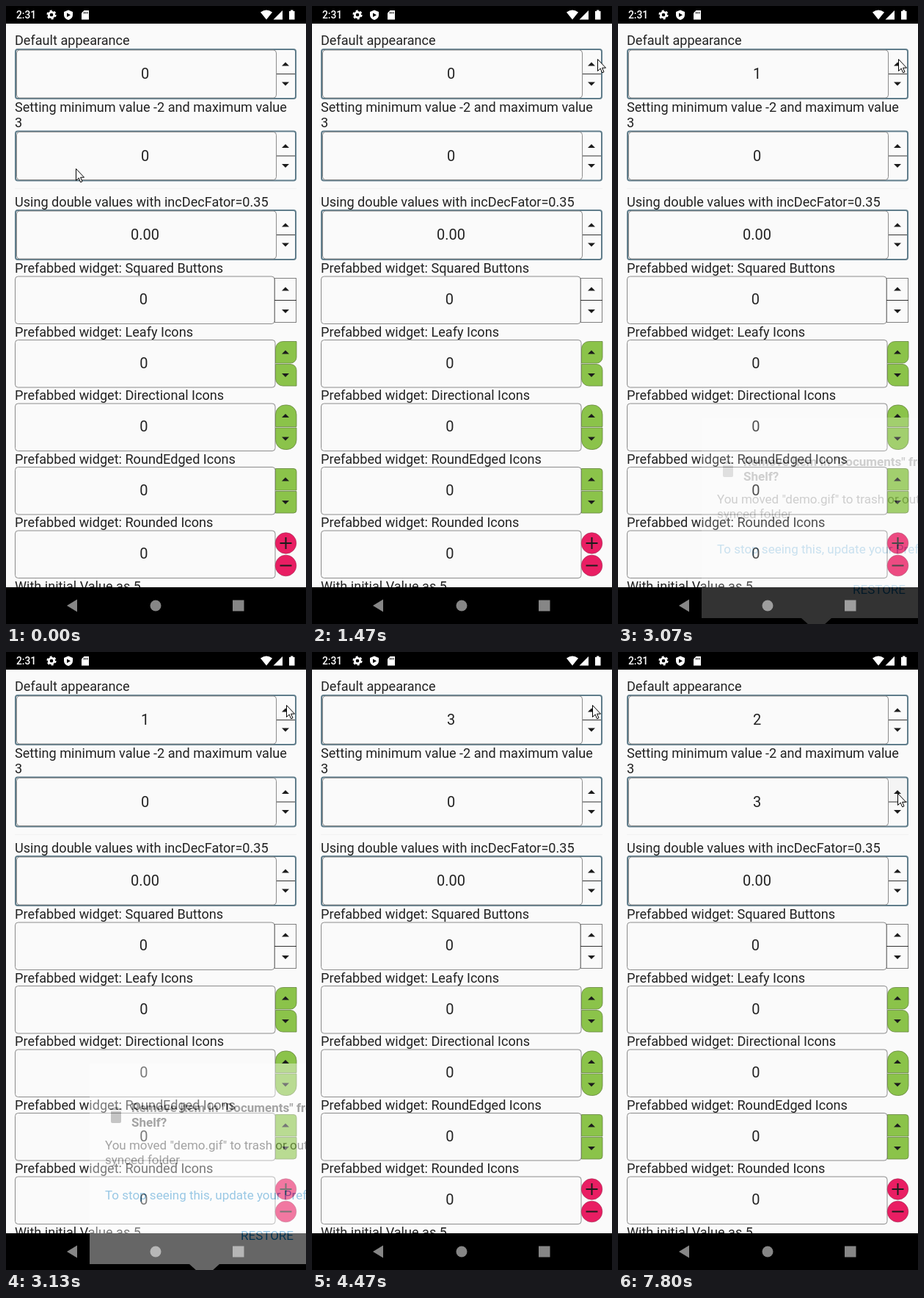
Animation of 409 by 841 pixels, one loop 8 s. Source, as an HTML page:

```html
<!DOCTYPE html>
<html lang="en">
<head>
<meta charset="utf-8">
<style>
html, body { margin: 0; width: 100%; height: 100%; overflow: hidden; background: #fafafa; }
svg { display: block; width: 409px; height: 841px; }
text { font: 18.1px Roboto, sans-serif; fill: #222; white-space: pre; }
.num { font-size: 20px; text-anchor: middle; }
.clock { font-size: 13.8px; font-weight: 500; fill: #fff; }
.frame { fill: none; stroke: #607d8b; stroke-width: 2; }
.field { fill: none; stroke: #8c8c8c; }
.line { stroke: #333; }
.icon { fill: #1c1c1c; }
.plain { fill: none; stroke: #808080; }
.green { fill: #8bc34a; stroke: #66853f; stroke-width: .8; }
.pink { fill: #e91e63; stroke: #9c2a50; stroke-width: .6; }
.sign { stroke: #1c1c1c; stroke-width: 2; }
#popup text { font-size: 17px; fill: #222; }
#popup .head { font-weight: 700; }
#popup .link { fill: #0b7fc7; }
</style>
</head>
<body>
<svg viewBox="0 0 409 841">
  <rect id="glow" x="370" y="172" width="24" height="32"/>
  <rect x="12" y="248" width="384" height="1" fill="#f2f2f2"/>
  <g id="list"></g>

  <rect width="409" height="24"/>
  <text class="clock" x="14" y="17">2:31</text>
  <g fill="#fff">
    <g fill="none" stroke="#fff">
      <circle cx="62" cy="12" r="3.7" stroke-width="2.8"/>
      <circle cx="62" cy="12" r="5.6" stroke-width="2" stroke-dasharray="2.93"/>
    </g>
    <path d="M85 5.5l6 2.500v4c0 3.500-2.500 6-6 7-3.500-1-6-3.500-6-7v-4z"/>
    <path d="M83 9.5l5 2.700-5 2.700z" fill="#000"/>
    <path d="M106.500 6h6.500v12.500h-10v-9z"/>
    <path d="M106.500 8v2.500M108.700 8v2.500M110.900 8v2.500" stroke="#000"/>
    <path d="M347 8.500Q355 2.500 363 8.500L355 18.500z"/>
    <path d="M377 6v12.500h-12.500z"/>
    <path d="M386 7h2V5.500h3.500V7h2v11.500H386z"/>
  </g>

  <rect y="791" width="409" height="50"/>
  <g fill="#868686">
    <path d="M83 816l14-8.500v17z"/>
    <circle cx="204" cy="816" r="7.5"/>
    <rect x="309" y="808.500" width="15.500" height="15"/>
  </g>

  <g id="popup">
    <path d="M114 560H409V833H291L281 842H260L250 833H114z" fill="#fff"/>
    <path d="M142 621h4l1.500-2h5l1.500 2h4v2.500h-16zM143 625h14v14q0 2-2 2h-10q-2 0-2-2z" fill="#777"/>
    <text class="head" x="171" y="626">Remove item in "Documents" from</text>
    <text class="head" x="171" y="646">Shelf?</text>
    <text x="135" y="677">You moved "demo.gif" to trash or out of</text>
    <text x="135" y="697">synced folder</text>
    <text class="link" x="135" y="745">To stop seeing this, update your Preferences</text>
    <text class="link" x="320" y="800">RESTORE</text>
  </g>

  <path id="cursor" d="M.5 .5V16.500L4.200 13 6.600 18.800 9 17.800 6.600 12.200H11.500z" fill="#fff" stroke="#000"/>
</svg>
<script>
const $ = id => document.getElementById(id);
const LOOP = 8000, FRAME = 200 / 3;

const label = (y, s) => `<text x="12" y="${y}">${s}</text>`;
const num = (x, y, s, id = '') => `<text class="num" id="${id}" x="${x}" y="${y}">${s}</text>`;
const up = y => `<path class="icon" d="M376 ${y + 2.5}l5-5 5 5z"/>`;
const down = y => `<path class="icon" d="M376 ${y - 2.5}l5 5 5-5z"/>`;
const rect = (cls, x, y, w, h, r = 0) =>
  `<rect class="${cls}" x="${x}" y="${y}" width="${w}" height="${h}" rx="${r}"/>`;

// Button with its own radius per corner: top left, top right, bottom right, bottom left
function button(y, [a, b, c, d]) {
  const x = 367.5, w = 28.5, h = 29.5;
  const arc = (r, dx, dy) => `a${r} ${r} 0 0 1 ${dx * r} ${dy * r}`;
  return `<path class="green" d="M${x + a} ${y}h${w - a - b}${arc(b, 1, 1)}v${h - b - c}` +
    `${arc(c, -1, 1)}h${c + d - w}${arc(d, -1, -1)}v${a + d - h}${arc(a, 1, -1)}z"/>`;
}

// Field inside a blue-grey frame
const framed = (dy, value, id) =>
  rect('frame', 13, 59 + dy, 382, 67, 3) +
  rect('field', 14.5, 60 + dy, 354, 65, 4) +
  `<path class="line" d="M369 ${92.5 + dy}H394"/>` +
  up(79 + dy) + down(106 + dy) + num(189.5, 99 + dy, value, id);

const squareButtons = y =>
  rect('plain', 366.5, y + 3, 29, 60) + `<path class="line" d="M366 ${y + 33}h30"/>` +
  up(y + 17.5) + down(y + 48);

// The lower button mirrors the upper one
const greenButtons = (a, b, c, d) => y =>
  button(y + 2.5, [a, b, c, d]) + button(y + 33.5, [d, c, b, a]) +
  up(y + 17) + down(y + 48.5);

const roundButtons = y =>
  [17.5, 48].map(dy => `<circle class="pink" cx="381.5" cy="${y + dy}" r="14.3"/>` +
    `<path class="sign" d="M373.500 ${y + dy}h16"/>`).join('') +
  `<path class="sign" d="M381.500 ${y + 9.5}v16"/>`;

const prefabs = [
  ['Squared Buttons', squareButtons],
  ['Leafy Icons', greenButtons(10, 0, 8, 0)],
  ['Directional Icons', greenButtons(13, 13, 0, 0)],
  ['RoundEdged Icons', greenButtons(0, 4, 0, 0)],
  ['Rounded Icons', roundButtons]
];

function prefab([name, buttons], i) {
  const y = 367.5 + 86.5 * i, w = i ? 354.5 : 353.5;
  return label(y - 4.5, 'Prefabbed widget: ' + name) +
    rect('field', 12.5, y + .5, w, 64.5, 4) +
    num(10.5 + w / 2, y + 38.5, 0) + buttons(y);
}

$('list').innerHTML =
  label(53, 'Default appearance') + framed(0, 0, 'first') +
  label(144, 'Setting minimum value -2 and maximum value') + label(165, '3') +
  framed(111.5, 0, 'second') +
  label(273, 'Using double values with incDecFator=0.35') + framed(219, '0.00') +
  prefabs.map(prefab).join('') +
  label(795.5, 'With initial Value as 5');

// Cursor moves: first frame, last frame, end point, ease-out power
const moves = [
  [0, 4, 351, 166, 1.5],
  [7, 11, 410, 101, 1],
  [12, 17, 393, 75, 3],
  [18, 19, 393, 72, 1],
  [21, 24, 382, 72, 1],
  [67, 70, 380, 116, 1],
  [82, 85, 381, 192, 1]
];

const clamp = (v, lo, hi) => Math.min(hi, Math.max(lo, v));

function cursorAt(f) {
  let x = 95, y = 221;
  for (const [from, to, endX, endY, power] of moves) {
    const k = 1 - (1 - clamp((f - from) / (to - from), 0, 1)) ** power;
    x += (endX - x) * k;
    y += (endY - y) * k;
  }
  return `translate(${Math.round(x)} ${Math.round(y)})`;
}

// Number of evenly spaced clicks so far, at most three
const clicks = (f, first, gap) => clamp(Math.floor((f - first) / gap) + 1, 0, 3);

function draw(t) {
  const f = Math.floor((t + 4) / FRAME);
  $('cursor').setAttribute('transform', cursorAt(f));
  $('first').textContent = clicks(f, 37, 15) - (f >= 79 ? 1 : 0);
  $('second').textContent = clicks(f, 108, 4);
  $('popup').setAttribute('opacity', f < 48 ? clamp((f - 45) * .2, 0, 1) : 0);
  $('glow').setAttribute('opacity', f < 108 ? 0 : .025);
}

const start = performance.now();
function tick() {
  draw((performance.now() - start) % LOOP);
  requestAnimationFrame(tick);
}
tick();
</script>
</body>
</html>
```
